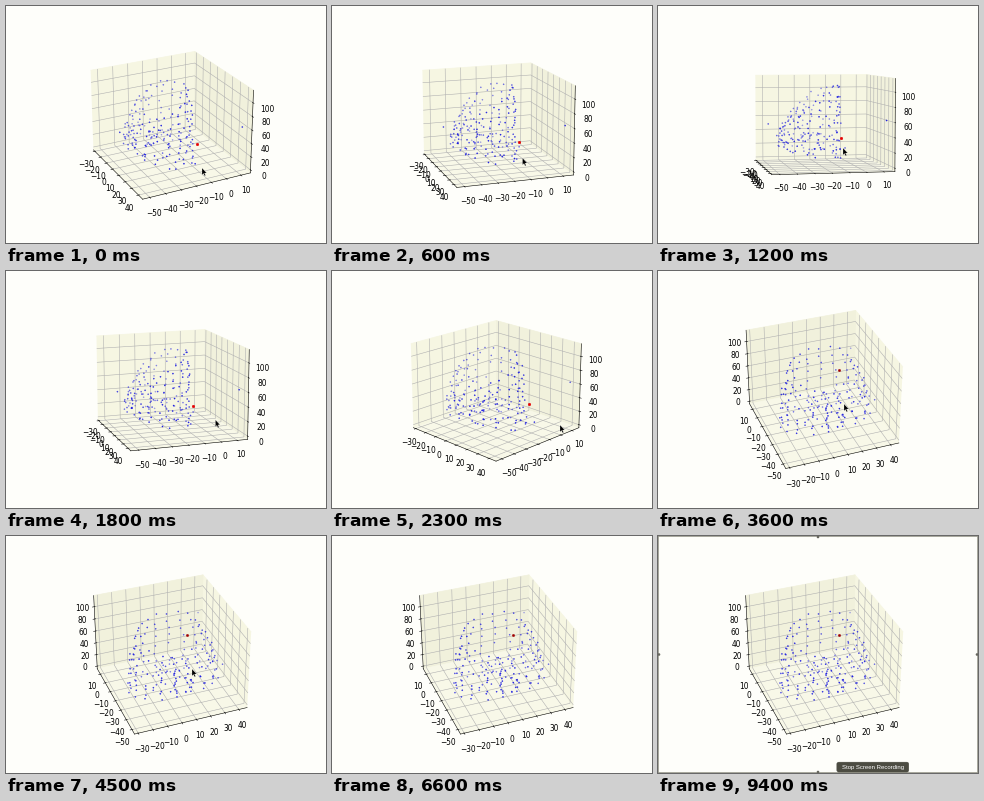
A matplotlib script that plays this animation: 320x237 px, repeating every 9500 ms.

```python
import numpy as np
import matplotlib.pyplot as plt
from matplotlib.animation import FuncAnimation
from matplotlib.patches import Circle, FancyBboxPatch, Polygon, Rectangle

W, H, DPI = 320, 237, 50
STEP, FRAMES = 100, 95
PAPER = "#fefefa"
BOX = np.array([1.1905, 1.1905, 0.8929])
LOW = np.array([-32.5, -54.5, -4.5])
HIGH = np.array([46, 16.5, 118])
RED_SWITCH, POINTER_END, BORDER_START, TIP_START = 3500, 5600, 7000, 8200


def ease(t, start, end):
    s = np.clip((t - start) / (end - start), 0, 1)
    return s * s * (3 - 2 * s)


def view(t):
    """Elevation and azimuth: a short swing back, then one long sweep."""
    azim = -27 + 16 * ease(t, 0, 1200) - 100 * ease(t, 1400, 3700)
    elev = (24.5 - 20 * ease(t, 0, 1200) + 15 * ease(t, 1200, 2300)
            + 14 * ease(t, 2900, 3700))
    return elev, azim


def pointer(t):
    x = (196 - 11 * ease(t, 0, 1200) + 43 * ease(t, 1200, 2300)
         - 42 * ease(t, 2300, 3500) + 16 * ease(t, 4800, 5600))
    y = (162 - 20 * ease(t, 0, 1200) + 12 * ease(t, 1200, 2300)
         - 21 * ease(t, 2300, 3500) + 106 * ease(t, 4800, 5600))
    return x, y


def to_data(p):
    """Centred box units to data units."""
    return ((LOW + HIGH) / 2 + np.atleast_2d(p) / BOX * (HIGH - LOW)).T


def scan_points():
    """Columns of samples on an oval wall that is lower at the front."""
    rng = np.random.default_rng(8)
    level, a = np.meshgrid(np.linspace(0, 1, 9), np.arange(18) * np.pi / 9)
    rho = 1 - 0.3 * level ** 3
    front = 0.5 - 0.5 * np.sin(a)
    low = -0.35 + 0.1 * front
    high = 0.34 - 0.26 * front ** 2
    wall = np.stack([-0.02 + 0.45 * rho * np.cos(a),
                     0.17 - 0.3 * rho * (1 - np.sin(a)),
                     low + (high - low) * level], axis=-1).reshape(-1, 3)
    wall += rng.normal(0, 0.012, wall.shape)
    wall = wall[rng.random(len(wall)) < 0.88]
    cluster = rng.normal((0.05, -0.16, -0.2), (0.17, 0.12, 0.07), (40, 3))
    strays = [(0.52, 0.53, 0.04), (-0.03, -0.54, -0.02)]
    return np.vstack([wall, cluster, strays])


fig = plt.figure(figsize=(W / DPI, H / DPI), dpi=DPI, facecolor=PAPER)

side = 184.6
ax = fig.add_axes([69.3 / W, 26.9 / H, side / W, side / H], projection="3d")
ax.set_facecolor(PAPER)
ax.set(xlim=(LOW[0], HIGH[0]), ylim=(LOW[1], HIGH[1]), zlim=(LOW[2], HIGH[2]),
       xticks=range(-30, 50, 10), yticks=range(-50, 20, 10),
       zticks=range(0, 120, 20))
for axis, color in zip((ax.xaxis, ax.yaxis, ax.zaxis),
                       ("#f6f6e2", "#f1f1dc", "#f8f8e8")):
    axis.set_pane_color(color, 1)
    axis.set_tick_params(labelsize=10.8)

ax.scatter(*to_data(scan_points()), s=3, c="#1414e0", linewidths=0.5)
reds = [ax.scatter(*to_data(p), s=s, c=c, depthshade=False, linewidths=0.5)
        for p, s, c in (((0.337, 0.123, -0.135), 15, "#e60000"),
                        ((0.222, 0.1, 0.085), 12, "#a00000"))]

# flat layer in pixel units for pointer, border and tooltip
top = fig.add_axes([0, 0, 1, 1], zorder=5)
top.set(xlim=(0, W), ylim=(H, 0))
top.axis("off")

ARROW = 0.8 * np.array([(0, 0), (0, 8.6), (1.9, 6.9), (3.2, 9.9), (4.5, 9.3),
                        (3.2, 6.4), (5.8, 6.2)])
arrow = top.add_patch(Polygon(ARROW, fc="black", ec="white", lw=0.3))

border = [Rectangle((0, 0), W, H, fill=False, ec="#98988c", lw=2.4)]
border += [Circle(c, 1.3, fc="#66665e", ec="none")
           for c in ((W / 2, 1), (W / 2, H - 1), (1, H / 2), (W - 1, H / 2))]
for part in border:
    top.add_patch(part)

tip = [top.add_patch(FancyBboxPatch((180.3, 227.6), 69, 7, fc="#4c4c42",
                                    ec="#4c4c42", lw=0.5,
                                    boxstyle="round,pad=1.5,rounding_size=2")),
       top.text(215, 231, "Stop Screen Recording", color="white",
                family="Liberation Sans", size=8.6, ha="center",
                va="center_baseline")]


def draw(i):
    t = i * STEP
    elev, azim = view(t)
    ax.view_init(elev=elev, azim=azim)
    reds[0].set_visible(t < RED_SWITCH)
    reds[1].set_visible(t >= RED_SWITCH)
    arrow.set_xy(ARROW + pointer(t))
    arrow.set_visible(t < POINTER_END)
    for part in border:
        part.set_visible(t >= BORDER_START)
    for part in tip:
        part.set_alpha(ease(t, TIP_START - STEP, TIP_START + 2 * STEP))
    return []


anim = FuncAnimation(fig, draw, frames=FRAMES, interval=STEP, repeat=True,
                     repeat_delay=0, init_func=lambda: draw(0))
plt.show()
```
